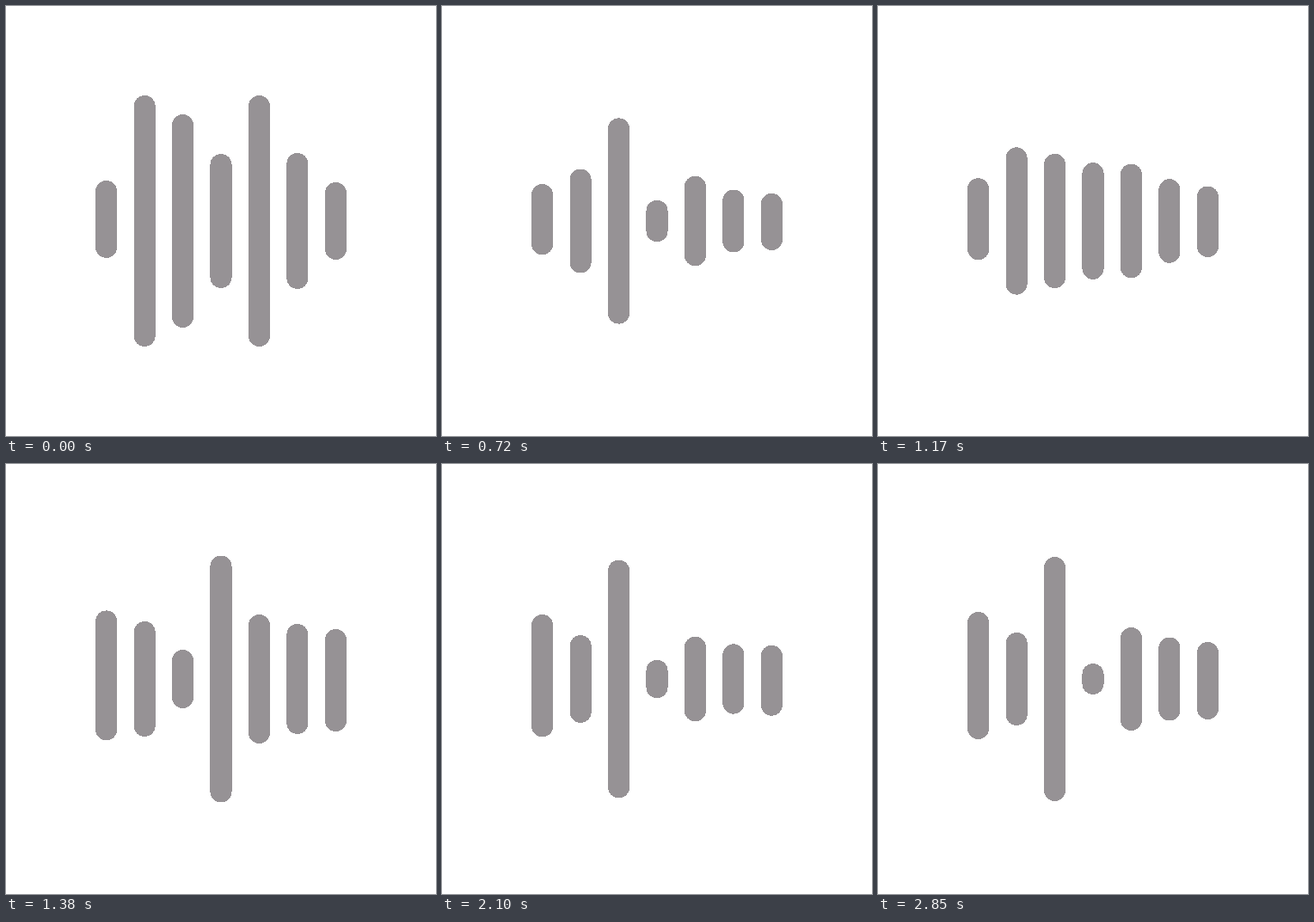
These frames come from a looping animation (500x500 px, 2910 ms). An HTML page:

```html
<!DOCTYPE html>
<html>
<head>
<meta charset="utf-8">
<style>
  html, body { margin: 0; width: 100%; height: 100%; overflow: hidden; background: #fff; }
  svg { display: block; width: 100%; height: 100%; }
</style>
</head>
<body>
<svg viewBox="0 0 500 500" fill="#969295" shape-rendering="crispEdges"></svg>
<script>
const LOOP = 2910, STEP = 30, LAST = 2850;
const WIDTH = 25.1, GAP = 44.46;
const times = [0, 450, 960, 1380, 1800, 2370, 2700, 2850];

// Bar heights at the times above, left to right.
const heights = [
  [90, 134, 39, 151, 148, 139, 148, 148],
  [292, 37, 191, 134, 42, 153, 117, 108],
  [248, 142, 278, 68, 120, 291, 280, 284],
  [156, 76, 37, 287, 92, 27, 33, 36],
  [292, 101, 112, 150, 84, 114, 118, 120],
  [158, 89, 67, 128, 67, 95, 97, 97],
  [90, 90, 46, 119, 79, 86, 90, 90]
];
const peaks = {
  2: [[900, 292], [2160, 290], [2310, 294]],
  3: [[1410, 300]]
};

const keysOf = (values, extra = []) =>
  values.map((v, i) => [times[i], v]).concat(extra).sort((a, b) => a[0] - b[0]);

// Monotone cubic curve through the keys, level at every extreme.
function curve(keys) {
  const slope = i => (keys[i + 1][1] - keys[i][1]) / (keys[i + 1][0] - keys[i][0]);
  const tangent = i => {
    if (i === 0 || i === keys.length - 1) return 0;
    const a = slope(i - 1), b = slope(i);
    return a * b > 0 ? 2 * a * b / (a + b) : 0;
  };
  return t => {
    let i = 0;
    while (i < keys.length - 2 && t >= keys[i + 1][0]) i++;
    const [t0, v0] = keys[i], [t1, v1] = keys[i + 1];
    const d = t1 - t0, u = (t - t0) / d, w = 1 - u;
    return w * w * ((1 + 2 * u) * v0 + u * d * tangent(i)) +
           u * u * ((3 - 2 * u) * v1 - w * d * tangent(i + 1));
  };
}

const lastShift = curve(keysOf([0, 2, 0, 1.5, 1.5, 2, 2, 2]));
const svg = document.querySelector("svg");
const bars = heights.map((values, i) => {
  const el = document.createElementNS("http://www.w3.org/2000/svg", "rect");
  el.setAttribute("x", 250 + GAP * (i - 3) - WIDTH / 2);
  el.setAttribute("width", WIDTH);
  el.setAttribute("rx", WIDTH / 2);
  svg.append(el);
  return { el, height: curve(keysOf(values, peaks[i])) };
});

function draw(now) {
  const t = Math.min(LAST, Math.floor(now % LOOP / STEP) * STEP);
  bars.forEach(({ el, height }, i) => {
    const h = height(t);
    const shift = i === 0 ? (27 - h) * 0.033 : i === 6 ? lastShift(t) : 0;
    el.setAttribute("y", 250 + shift - h / 2);
    el.setAttribute("height", h);
  });
}

const start = performance.now();
function tick() {
  draw(performance.now() - start);
  requestAnimationFrame(tick);
}
tick();
</script>
</body>
</html>
```
